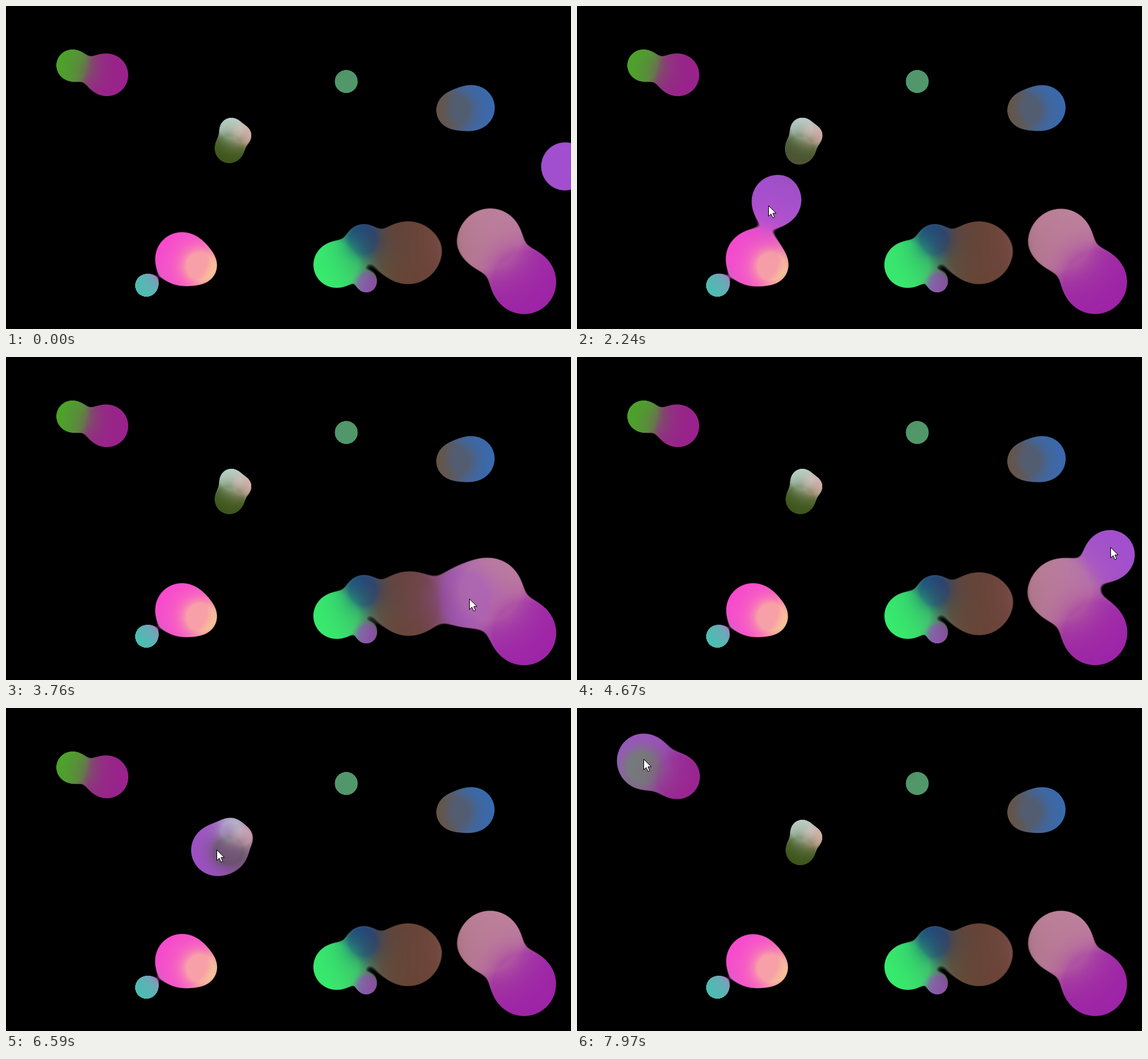
Animation, 910 px wide and 520 px high, one loop 8000 ms. Source, as an HTML page with a canvas:

```html
<!DOCTYPE html>
<html lang="en">
<head>
<meta charset="utf-8">
<title>Metaballs</title>
<style>
  html, body { margin: 0; width: 100%; height: 100%; overflow: hidden; background: #000; }
  canvas { display: block; width: 910px; height: 520px; }
</style>
</head>
<body>
<canvas id="stage" width="910" height="520"></canvas>
<script>
const W = 910, H = 520, LOOP = 8000, START = 830, LAG = 30, POWER = 2.7;
const ctx = document.getElementById('stage').getContext('2d');

// x, y, radius, colour, optional falloff power
const balls = [
  [106, 95.4, 24, 0x44af20],
  [163, 111, 33.3, 0x9c1c8f],
  [362.5, 197.5, 16, 0xc3e1dc],
  [380, 208, 13, 0xf0b9b9],
  [359.5, 230, 22, 0x2d4b08],
  [548, 121.5, 18.2, 0x50996a],
  [752, 163.4, 33.5, 0x326cb9],
  [721, 168, 25, 0x704e2a],
  [282.5, 406.5, 41, 0xfa42d2],
  [313, 419, 22, 0xfaff7d],
  [225.8, 450.2, 17, 0x32cdaf, 4],
  [531.5, 417, 35, 0x32fa6e],
  [575, 377, 22, 0x103487],
  [648, 397.5, 48.3, 0x663c2d],
  [580.5, 445.7, 13.5, 0xa53ccd, 4],
  [780, 375.6, 47.5, 0xc3869e, 3],
  [834.9, 444.9, 50, 0x9d1ea9, 4]
];
const mover = { r: 37.8, color: [163, 77, 211] };

// time, x, y of the dragged ball
const path = [
  [START, 901, 258], [1320, 845, 256], [1700, 620, 300], [2000, 455, 272],
  [2240, 322, 312], [2500, 240, 400], [2850, 370, 440], [3250, 540, 435],
  [3520, 640, 402], [3760, 738, 386], [4200, 830, 445], [4500, 858, 380],
  [4950, 840, 215], [5450, 712, 110], [6000, 530, 155], [6400, 350, 232],
  [6590, 338, 229], [6900, 350, 215], [7500, 195, 130], [7970, 106.5, 82]
];

const rgb = c => [c >> 16, c >> 8 & 255, c & 255];

// Summed weights and weighted colours of the resting balls
const sum = new Float32Array(W * H);
const tint = new Float32Array(W * H * 3);
for (const [bx, by, r, color, power = POWER] of balls) {
  const [cr, cg, cb] = rgb(color);
  for (let y = 0, i = 0; y < H; y++) {
    for (let x = 0; x < W; x++, i++) {
      const q = r * r / ((x + .5 - bx) ** 2 + (y + .5 - by) ** 2);
      const w = q >= 1 ? 1 : Math.pow(q, power / 2);
      sum[i] += w;
      tint[i * 3] += w * cr;
      tint[i * 3 + 1] += w * cg;
      tint[i * 3 + 2] += w * cb;
    }
  }
}

const slope = (i, k) => {
  const a = path[i - 1], b = path[i + 1];
  return a && b ? (b[k] - a[k]) / (b[0] - a[0]) : 0;
};

function positionAt(t) {
  const last = path.length - 1;
  if (t <= path[0][0]) return path[0].slice(1);
  if (t >= path[last][0]) return path[last].slice(1);
  const i = path.findIndex(p => p[0] > t) - 1;
  const a = path[i], b = path[i + 1], span = b[0] - a[0];
  const u = (t - a[0]) / span, u2 = u * u, u3 = u2 * u;
  return [1, 2].map(k =>
    (2 * u3 - 3 * u2 + 1) * a[k] + (3 * u2 - 2 * u3) * b[k] +
    span * ((u3 - 2 * u2 + u) * slope(i, k) + (u3 - u2) * slope(i + 1, k)));
}

const image = ctx.createImageData(W, H);
const px = image.data;

function drawBalls(mx, my) {
  const rr = mover.r ** 2, [cr, cg, cb] = mover.color;
  px.fill(0);
  for (let y = 0, i = 0; y < H; y++) {
    const dy2 = (y + .5 - my) ** 2;
    for (let x = 0; x < W; x++, i++) {
      const dx = x + .5 - mx;
      const q = rr / (dx * dx + dy2);
      if (sum[i] + q < .96) continue;
      const w = q >= 1 ? 1 : Math.pow(q, POWER / 2);
      const s = sum[i] + w;
      const cover = (s - 1) / .07 + .5;
      if (cover <= 0) continue;
      const o = i * 4, c = i * 3;
      px[o] = (tint[c] + w * cr) / s;
      px[o + 1] = (tint[c + 1] + w * cg) / s;
      px[o + 2] = (tint[c + 2] + w * cb) / s;
      px[o + 3] = Math.min(1, cover) * 255;
    }
  }
  ctx.putImageData(image, 0, 0);
}

const arrow = new Path2D('M0 0V17L4 13.2L6.8 19.6L9.6 18.4L6.9 12.2H12.2Z');

function drawCursor(x, y) {
  ctx.save();
  ctx.translate(Math.round(x) + .5, Math.round(y) + .5);
  ctx.fillStyle = '#fff';
  ctx.strokeStyle = '#000';
  ctx.lineWidth = 1;
  ctx.fill(arrow);
  ctx.stroke(arrow);
  ctx.restore();
}

const origin = performance.now();

function frame() {
  const t = (performance.now() - origin) % LOOP;
  drawBalls(...positionAt(t));
  if (t >= START) drawCursor(...positionAt(t + LAG));
  requestAnimationFrame(frame);
}
frame();
</script>
</body>
</html>
```
